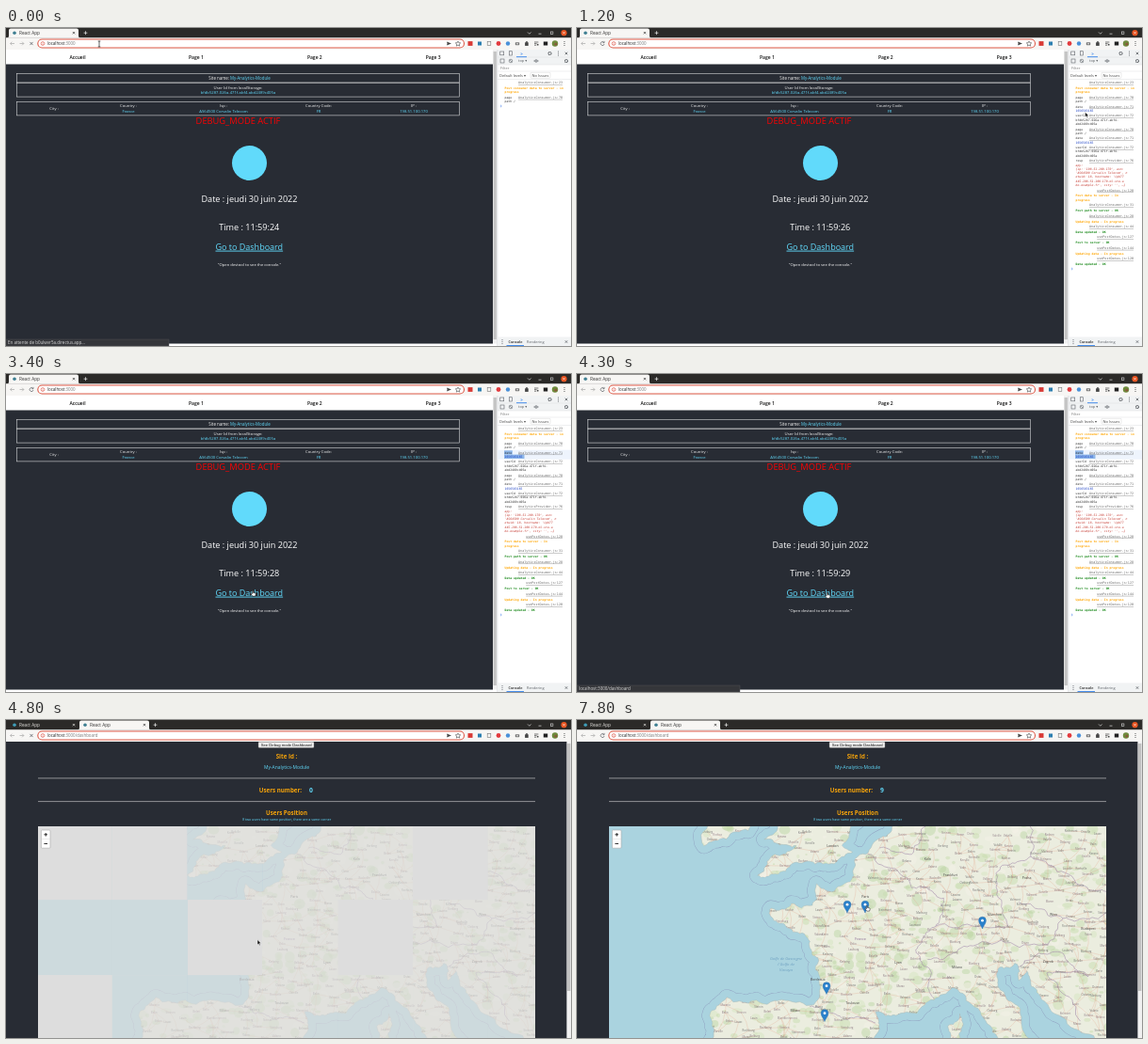
Write an HTML page that moves like this. It is 600 by 338 pixels and loops after 8000 ms.

```html
<!DOCTYPE html>
<html lang="fr">
<head>
<meta charset="utf-8">
<title>React App</title>
<style>
html, body { margin: 0; width: 100%; height: 100%; overflow: hidden; background: #fff; }
svg { display: block; width: 600px; height: 338px; font-family: "Open Sans", "Noto Sans", sans-serif; }
.mono { font-family: "DejaVu Sans Mono", "Liberation Mono", monospace; }
.plain { font-family: "Liberation Sans", sans-serif; }
.mid { text-anchor: middle; }
.end { text-anchor: end; text-decoration: underline; }
.link { text-decoration: underline; }
.bold { font-weight: 700; }
.semi { font-weight: 600; }
.ital { font-style: italic; }
</style>
</head>
<body>
<svg id="stage" viewBox="0 0 600 338" xmlns="http://www.w3.org/2000/svg"></svg>
<script>
const LOOP = 8000, DARK = '#282c34', CYAN = '#61dafb', ORANGE = '#f5a30a', GREY = '#5f6368';
const SITE = 'My-Analytics-Module', IP = '198.51.100.170', ISP = 'AS64500 Corvalin Telecom';

// Drawing helpers; text is placed by its visual middle line.
const text = (x, y, s, size, fill, cls = '', id = '') =>
  `<text x="${x}" y="${y + size * 0.35}" font-size="${size}" fill="${fill}" class="${cls}" ${id && `id="${id}"`}>${s}</text>`;
const rect = (x, y, w, h, fill, more = '') =>
  `<rect x="${x}" y="${y}" width="${w}" height="${h}" fill="${fill}" ${more}/>`;
const frame = (x, y, w, h, stroke, width = 0.6) => rect(x, y, w, h, 'none', `stroke="${stroke}" stroke-width="${width}"`);
const dot = (x, y, r, fill, more = '') => `<circle cx="${x}" cy="${y}" r="${r}" fill="${fill}" ${more}/>`;
const ring = (x, y, r, stroke) => dot(x, y, r, 'none', `stroke="${stroke}" stroke-width=".6"`);
const line = (d, stroke, w = 0.7, more = '') =>
  `<path d="${d}" fill="none" stroke="${stroke}" stroke-width="${w}" ${more}/>`;
const group = (id, body, more = '') => `<g id="${id}" ${more}>${body}</g>`;
const cross = (x, y, r, c, w = 0.8) =>
  line(`M${x - r} ${y - r}l${2 * r} ${2 * r}M${x + r} ${y - r}l${-2 * r} ${2 * r}`, c, w);
const plus = (x, y, r, c, w = 0.8) => line(`M${x - r} ${y}h${2 * r}M${x} ${y - r}v${2 * r}`, c, w);
const dots = (x, y, c) => [-2, 0, 2].map(d => dot(x, y + d, 0.55, c)).join('');
const gear = (x, y) => dot(x, y, 1.5, 'none', `stroke="${GREY}" stroke-width="1.1" stroke-dasharray="1 .3"`);

// Browser window
function tab(x, active, favicon) {
  const c = active ? '#333' : '#e4e2de';
  return (active ? `<path d="M${x + 1} 10.5q2 0 2-2V2.5q0-2 2-2H${x + 75}q2 0 2 2V8.5q0 2 2 2z" fill="#f7f6f4"/>` : '') +
    dot(x + 9, 5.2, 1.8, favicon) + text(x + 14, 5.2, 'React App', 4.7, c) + cross(x + 72, 5.2, 1.2, c, 0.7);
}
function extensions(y) {
  const dark = '#444', icons = [
    x => rect(x - 2.5, y - 2.4, 5, 4.8, '#d93a36'),
    x => rect(x - 2, y - 2, 4, 4, '#2c7fb0'),
    x => frame(x - 1.8, y - 2, 3.6, 4, '#777'),
    x => dot(x, y, 2.4, '#e23b3f'),
    x => dot(x, y, 2.2, '#4a90d9'),
    x => rect(x - 2.2, y - 1.3, 4.4, 3, '#777', 'rx=".6"') + dot(x, y + 0.2, 0.8, '#f7f6f4'),
    x => rect(x - 1.9, y - 1.2, 3.6, 3.6, dark) + dot(x, y - 1.5, 0.9, dark),
    x => line(`M${x - 2} ${y - 1.5}h4.4m-4.4 1.6h2.6m-2.6 1.6h2.2`, dark) + dot(x + 1.7, y + 1.2, 0.9, dark),
    x => rect(x - 2.2, y - 2, 4.4, 4, '#222'),
    x => dot(x, y, 3.2, '#6f8b3d') + dot(x + 0.8, y + 0.7, 1.4, '#8a5c3c'),
    x => dots(x, y, dark)];
  return icons.map((icon, i) => icon(493 + i * 10)).join('');
}
function browser() {
  const y = 16.5, light = '#ddd';
  return rect(0, 0, 600, 10.5, '#2b2a28') +
    group('tabsOne', tab(0, true, '#3f7f92') + plus(84.5, 5.2, 1.9, light)) +
    group('tabsTwo', tab(0, false, '#3f9db8') + tab(75, true, '#3f7f92') + plus(158.5, 5.2, 1.9, light)) +
    line('M554 4.5l1.8 1.8 1.8-1.8M565.5 6.2h3', light) + frame(578.3, 4, 2.6, 2.6, light) +
    dot(592.5, 5.2, 3.1, '#e95420') + cross(592.5, 5.2, 1.1, '#fff', 0.6) +
    rect(0, 10.5, 600, 12.5, '#f7f6f4') +
    line(`M9 ${y}h-4.4m1.8-1.8l-1.8 1.8 1.8 1.8M14.5 ${y}h4.4m-1.8-1.8l1.8 1.8-1.8 1.8`, '#aaa') +
    group('stop', cross(27, y, 1.6, GREY)) +
    group('reload', line('M28.7 15.4a2 2 0 1 0 .3 1.6M29 13.9v1.8h-1.8', GREY)) +
    rect(33.8, 12, 452.7, 9, '#fff', 'rx="4.5" stroke="#dd5a48" stroke-width="1.1"') +
    ring(39, y, 1.9, '#d9483b') + line('M39 15.4v.5m0 .5v1.4', '#d9483b', 0.6) +
    text(44, y, '<tspan fill="#222">localhost</tspan>:3000<tspan id="path"></tspan>', 4.4, '#777') +
    '<path d="M468 14.4l5 2.1-5 2.1.6-2.1z" fill="#444"/>' +
    line('M480 14l.8 1.7 1.9.2-1.4 1.3.4 1.9-1.7-1-1.7 1 .4-1.9-1.4-1.3 1.9-.2z', '#444', 0.6) + extensions(y);
}

// Home page
function home() {
  const nav = ['Accueil', 'Page 1', 'Page 2', 'Page 3'];
  const info = [['Country :', 'France'], ['Isp :', ISP], ['Country Code:', 'FR'], ['IP :', IP]];
  const w = '#f4f4f4', mid = 'mid', box = (y, h) => frame(11.6, y, 469.8, h, '#d5d6d8');
  return rect(0, 23, 522, 315, '#fff') + rect(0, 38.5, 517, 297, DARK) +
    nav.map((s, i) => text(76 + i * 125.9, 31, s, 5, '#111', 'mid semi')).join('') +
    box(48.5, 9.6) + box(58.1, 15) + box(78.3, 14.6) +
    text(248, 53.3, `Site name: <tspan fill="${CYAN}">${SITE}</tspan>`, 4.4, w, mid) +
    text(246.5, 63.6, 'User Id from localStorage:', 4.3, w, mid) +
    text(246.5, 68.6, 'bfdb5287-026a-471f-abf4-abd2489c405a', 4.2, CYAN, mid) +
    text(51, 85.8, 'City :', 4.2, w, mid) +
    info.map(([k, v], i) => text(130 + i * 101, 83, k, 4.2, w, mid) + text(130 + i * 101, 88.3, v, 4.2, CYAN, mid)).join('') +
    text(246.5, 99, 'DEBUG_MODE ACTIF', 9.3, '#f00', mid) +
    dot(258.5, 143.5, 18.5, CYAN) +
    text(258.5, 182.3, 'Date : jeudi 30 juin 2022', 9.1, '#fff', mid) +
    text(258.3, 212.3, '', 9.1, '#fff', mid, 'clock') +
    text(258.3, 232.5, 'Go to Dashboard', 9, CYAN, 'mid link') +
    text(258.5, 251.5, '"Open devtool to see the console."', 4.2, '#fff', mid) +
    rect(517, 23, 4.6, 312.5, '#f1f1f1') + rect(517.6, 25, 3.3, 306, '#c4c4c4') +
    group('status', rect(0, 331, 173, 7, '#35363a', 'stroke="#55565a" stroke-width=".4"') + text(2, 334.7, '', 4.5, '#ddd', '', 'statusText')) +
    devtools();
}

// Console: entries flow downwards; each row keeps the time it appears.
function consoleRows() {
  const ANALYTICS = 'AnalyticsConsumer.js:', POST = 'usePostDatas.js:';
  const INK = '#333', BLUE = '#1a3fc4', RED = '#c4382f', AMBER = '#ffa500', GREEN = '#1c8a1c';
  const LINE = 4.3, LEAD = 5.9, GAP = 5.5, rows = [];
  let y = 58;
  const entry = (at, link, label, lines, fill = INK, cls = '') => {
    rows.push({ at, y, s: label, fill: INK, cls: '', link });
    lines.forEach((s, i) => {
      y += label || i ? LINE : LEAD;
      rows.push({ at, y, s, fill, cls, link: '' });
    });
    y += GAP;
  };
  const message = (at, link, fill, ...lines) => entry(at, link, '', lines, fill, 'bold');

  message(0, ANALYTICS + 23, AMBER, 'Post consumer data to server - in', 'progress');
  for (const at of [0, 400]) {
    entry(at, ANALYTICS + 70, 'page', ['path /']);
    entry(at || 300, ANALYTICS + 71, 'date', ['1656583165'], BLUE);
    entry(at || 300, ANALYTICS + 72, 'userId', ['bfdb5287-026a-471f-abf4-', 'abd2489c405a']);
  }
  entry(500, 'AnalyticsProvider.js:76', 'resp', ['apy:', `{ip: '${IP}', asn:`, `'${ISP}', n`,
    "etwid: 18, hostname: 'ipb77", '445-198-51-100-170.ml.ste.a', "bo.example.fr', city: '', …}"], RED, 'ital');
  message(600, POST + 120, AMBER, 'Post data to server - In', 'progress');
  message(700, ANALYTICS + 31, GREEN, 'Post path to server - OK');
  message(700, ANALYTICS + 28, AMBER, 'Updating data - In progress');
  message(800, ANALYTICS + 44, GREEN, 'Data updated - OK');
  message(800, POST + 127, GREEN, 'Post to server - OK');
  message(900, POST + 144, AMBER, 'Updating data - In progress');
  message(900, POST + 120, GREEN, 'Data updated - OK');
  return rows;
}
const rows = consoleRows();
function devtools() {
  const rule = y => line(`M522 ${y}h78`, '#d5d7da', 0.4);
  return rect(521.6, 23, 78.4, 315, '#fff') + rect(522, 23, 78, 16, '#f1f3f4') + line('M521.8 23V338', '#c5c7ca', 0.5) +
    [31, 39, 46, 54.5, 329].map(rule).join('') +
    frame(524.7, 25, 4, 3.8, GREY) + frame(534.5, 24.7, 2.8, 4.3, GREY) +
    text(547.5, 26.8, '»', 5, '#1a73e8', 'mid') + line('M542 30.7h11', '#1a73e8', 0.8) +
    gear(577.5, 27) + dots(586.5, 27, GREY) + cross(595, 27, 1.3, GREY) +
    frame(525, 33, 4, 4, GREY) + ring(536, 35, 1.8, GREY) + line('M534.7 33.7l2.6 2.6', GREY, 0.6) +
    text(544, 35, 'top ▾', 4, GREY) + line('M560.6 35q2.4-3 4.8 0q-2.4 3-4.8 0', GREY, 0.6) + dot(563, 35, 0.8, GREY) + gear(595, 35) +
    text(525, 43, 'Filter', 4, '#777') + text(524, 50.3, 'Default levels ▾', 4, '#444') +
    rect(557, 47.3, 21, 6, '#fff', 'rx="1" stroke="#ccc" stroke-width=".4"') + text(567.5, 50.3, 'No Issues', 4, '#444', 'mid') +
    group('selection', rect(522, 80.7, 78, 10, '#eef4fd') + rect(529, 81.3, 8.8, 4.3, '#8fb8ea') + rect(529, 85.6, 21.5, 4.4, '#8fb8ea')) +
    group('log', rows.map(r => `<g>${r.s && text(529.5, r.y, r.s, 3.15, r.fill, 'mono ' + r.cls)}` +
      `${r.link && text(591, r.y, r.link, 3.4, '#666', 'mono end')}</g>`).join('')) +
    group('prompt', line('M525 -1.2l1.3 1.2-1.3 1.2', '#3b78e7', 0.6)) +
    rect(522, 329, 78, 9, '#f1f3f4') + dots(527, 333.5, GREY) + text(533.5, 333.5, 'Console', 3.9, '#222', 'semi') +
    line('M531.5 337.5h18.5', '#1a73e8', 0.8) + text(553, 333.5, 'Rendering', 3.9, GREY) + cross(595, 333.5, 1.2, GREY);
}

// Map: Web Mercator with 80 px tiles; outlines are a few places joined by rough lines.
const TILE = 80;
let seed = 7;
const rnd = () => (seed = seed * 16807 % 2147483647) / 2147483647;
const pick = list => list[Math.floor(rnd() * list.length)];
const project = (lon, lat) => [272.8 + lon * TILE / 5.625,
  191 + TILE * (10 - 32 * Math.asinh(Math.tan(lat * Math.PI / 180)) / Math.PI)];
function roughen([x, y], [u, v], depth) {
  const length = Math.hypot(u - x, v - y);
  if (!depth || length < 3) return [[u, v]];
  const shift = (rnd() - 0.5) * Math.min(0.4, 8 / length);
  const mid = [(x + u) / 2 + (v - y) * shift, (y + v) / 2 - (u - x) * shift];
  return [...roughen([x, y], mid, depth - 1), ...roughen(mid, [u, v], depth - 1)];
}
function outline(places) {
  const points = places.split(' ').map(p => project(...p.split(',').map(Number)));
  const path = points.flatMap((p, i) => i ? roughen(points[i - 1], p, 4) : [p]);
  return 'M' + path.map(p => p.map(v => v.toFixed(1)).join(' ')).join('L');
}
const coasts = [
  '22,54 4.7,54 4.2,52.1 1.6,50.9 1.5,50.1 -.2,49.3 -1.3,49.7 -1.6,48.65 -4.7,48.5 -4.5,47.9 -2.1,47.1 -1.2,46 -1.5,43.5 -5.8,43.75 -8,43.9 -9.2,43.1 -8.8,40 2,40.5 3.2,41.9 3.1,43.1 6.2,43.05 8.8,44.4 10.3,43.5 12.7,41 16,40 14,42.7 12.4,44.3 12.4,45.5 13.5,45.7 13.8,44.8 14.4,45.3 15.5,43.8 19.4,41.8 22,40',
  '-5.7,50.1 -3.6,50.3 -3,50.7 .2,50.75 1.4,51.2 .6,51.5 1.7,52.6 1.7,54 -4,54 -4.2,52.4 -5.2,51.8 -2.8,51.5 -4.4,51.1 -5.7,50.1',
  '-6.3,54 -6.4,52.2 -9.7,51.5 -9.7,54', '8.6,42.4 9.4,43 9.4,41.5 8.7,41.7 8.6,42.4'];
const borders = ['-1.8,43.4 .7,42.7 3.1,42.5', '2.5,51.1 5.8,49.5 8.2,49 7.6,47.6 6.1,46.4 7,45.5 7.5,43.8',
  '7.6,47.6 13,47.6 12.1,50.2 14.7,51 14.6,52.6', '7,45.9 10.4,46.6 16,46.7 17.1,48 13.8,48.8',
  '14.7,51 18.7,49.6 20.5,49.3', '17.1,48 20.5,48.3', '3.4,51.4 5.8,51.1 7,52.6', '13.6,45.5 16.5,46.3 19,45 15.9,45.2 18.4,42.6'];
const cities = 'Paris,2.35,49.05 London,-.1,51.5 Bordeaux,-1.2,44.85 Toulouse,1.4,43.6 Lyon,4.8,45.75 Bilbao,-2.9,43.2 Köln,7,50.9 Frankfurt,8.7,50.1 München,12,48.2 Praha,14.4,50 Wien,16.4,48.2 Milano,9.2,45.5 Zagreb,16,45.8 Budapest,19,47.5'
  .split(' ').map(c => { const [name, lon, lat] = c.split(','); return [name, ...project(lon, lat)]; });

// Small print: made-up town names on a jittered grid.
function scatterTowns() {
  const towns = [];
  for (let y = 118; y < 338; y += 9) for (let x = 130; x < 570; x += 19) {
    const spot = [x + rnd() * 16, y + rnd() * 7];
    const name = pick(['Bel', 'Mar', 'Lau', 'Ost', 'Val', 'Ker', 'Roch', 'Stein']) + pick(['ville', 'berg', 'mont', 'ac', 'burg', 'ano', 'in', 'en']);
    if (cities.every(([, u, v]) => Math.abs(u - spot[0]) > 15 || Math.abs(v - spot[1]) > 5)) towns.push([name, ...spot]);
  }
  return towns;
}
function terrain() {
  let s = '';
  for (let i = 0; i < 900; i++) {
    const x = 120 + rnd() * 445, y = 110 + rnd() * 230, r = 1 + rnd() * 5;
    s += `<ellipse cx="${x.toFixed(1)}" cy="${y.toFixed(1)}" rx="${r.toFixed(1)}" ry="${(r * (0.4 + rnd() * 0.8)).toFixed(1)}" ` +
      `fill="${pick(['#c3d9a8', '#d3e2bd', '#b9d3a0', '#f3efe6'])}" opacity=".45"/>`;
  }
  return s;
}
function roads(places) {
  let d = '';
  places.forEach(([, x, y], i) => places.slice(i + 1).forEach(([, u, v]) => {
    if (Math.hypot(u - x, v - y) < 22 && rnd() < 0.4)
      d += `M${x.toFixed(1)} ${y.toFixed(1)}Q${((x + u) / 2 + (v - y) * 0.15).toFixed(1)} ${((y + v) / 2).toFixed(1)} ${u.toFixed(1)} ${v.toFixed(1)}`;
  }));
  return line(d, '#e0a58e', 0.4, 'opacity=".7"');
}
const pin = (x, y) => `<path transform="translate(${x} ${y})" d="M0 0C-1-3.2-3.9-5.5-3.9-8.9a3.9 3.9 0 0 1 7.8 0C3.9-5.5 1-3.2 0 0z" fill="#2a81cb" stroke="#2569a5" stroke-width=".4"/>` + dot(x, y - 8.8, 1.4, '#fff');

function map() {
  const land = coasts.map(outline).join('Z') + 'Z';
  const towns = scatterTowns(), late = ['0,0', '1,0', '5,0', '2,1', '4,1', '0,2'];
  let veil = '';
  for (let row = 0; row < 3; row++) for (let col = 0; col < 7; col++)
    veil += rect(33 + col * 79.8, 111 + row * TILE, 79.9, TILE + 0.1, '#ddd', `class="veil" data-from="${late.includes(col + ',' + row) ? 4800 : 4740}"`);
  return `<clipPath id="frame">${rect(34, 113, 528, 225, '#000')}</clipPath><clipPath id="land"><path d="${land}"/></clipPath>` +
    group('map', rect(34, 113, 528, 225, '#aad3df') +
      line(land, '#8f9fc0', 17, 'stroke-linejoin="round"') + line(land, '#aad3df', 16.2, 'stroke-linejoin="round"') +
      `<path d="${land}" fill="#ebeddf" stroke="#a5b9b6" stroke-width=".5"/>` +
      `<g clip-path="url(#land)">${terrain()}${roads([...cities, ...towns])}` +
      borders.map(b => line(outline(b), '#a78fae', 0.6)).join('') +
      towns.map(([n, x, y]) => text(x, y, n, 2.9, pick(['#777', '#8a7a80', '#96848c']), 'mid')).join('') + '</g>' +
      cities.map(([n, x, y]) => text(x, y, n, 3.5, '#444', 'mid')).join('') +
      text(301, 233, 'France', 3.9, '#8d6f97', 'mid') +
      ['Golfe de Gascogne', '/ Golfo de', 'Vizcaya'].map((s, i) => text(222, 254 + i * 6, s, 4.2, '#6d9fc0', 'mid ital')).join('') +
      veil + group('pins', pin(287, 205) + pin(306, 205) + pin(430.5, 222) + pin(265, 291.5) + pin(263, 320.5)),
      'clip-path="url(#frame)"') +
    rect(37.4, 117, 9.6, 19.2, '#fff', 'rx="1" stroke="#aaa" stroke-width=".6"') + line('M37.5 126.6h9.4', '#ccc', 0.4) +
    plus(42.2, 121.8, 1.8, '#000') + line('M40.4 131.5h3.6', '#000', 0.8);
}
function dashboard() {
  const head = (x, y, s) => text(x, y, s, 6.2, ORANGE, 'mid bold');
  return rect(0, 23, 600, 315, DARK) +
    rect(268, 23.2, 59, 6.2, '#efefef', 'rx=".8" stroke="#777" stroke-width=".4"') + text(297.7, 26.2, 'See Debug mode Dashboard', 4.17, '#111', 'mid plain') +
    head(298, 39, 'Site Id :') + text(298, 50.4, SITE, 4.95, CYAN, 'mid') +
    head(291.4, 74.5, 'Users number:') + text(324, 74.5, '0', 6.8, CYAN, 'mid bold', 'users') +
    head(298, 99, 'Users Position') + text(298, 106, 'If two users have same position, there are a same corner', 3.58, CYAN, 'mid') +
    line('M34 61.9H562M34 86.6H562', '#c9c9c9', 0.65) + map() +
    rect(595.4, 23, 4.6, 315, '#f1f1f1') + rect(596, 25, 3.4, 263, '#c1c1c1');
}

const cursors = group('cursor',
  group('beam', line('M-1.3-3h2.6M0-3v6M-1.3 3h2.6', '#222', 0.7)) +
  group('arrow', '<path d="M0-2.4v5.3l1.3-1.1.9 1.9.9-.4-.9-1.9h1.7z" fill="#111" stroke="#fff" stroke-width=".45"/>') +
  group('hand', '<path d="M-.6-2.6q.7-.5 1 0v2l2.1.5q.9.3.7 1.2l-.6 2h-2.8l-1.9-2.3q.2-.8 1.5-.1z" fill="#fff" stroke="#111" stroke-width=".5"/>'));

document.getElementById('stage').innerHTML =
  group('home', home()) + group('dash', dashboard()) + group('blank', rect(0, 23, 600, 315, '#fefefe')) + browser() + cursors;

const $ = id => document.getElementById(id);
const show = (el, on) => el.setAttribute('visibility', on ? 'inherit' : 'hidden');
const clamp = v => Math.max(0, Math.min(1, v));
const veils = [...document.querySelectorAll('.veil')], logRows = [...$('log').children];

// Pointer stops: [time, x, y], eased in between
const stops = [[0, 99, 17], [1100, 539, 92], [1800, 550, 88], [2700, 288, 128], [3300, 262, 233], [4800, 267, 236],
  [5300, 206, 58], [5500, 290, 33], [5800, 354, 33], [6400, 533, 64], [6800, 533, 64], [7400, 345, 232], [7700, 308, 200], [LOOP, 308, 200]];
function pointer(t) {
  const i = stops.findIndex(s => s[0] > t), [a, x, y] = stops[i - 1], [b, u, v] = stops[i];
  const p = (t - a) / (b - a), e = p * p * (3 - 2 * p);
  return [x + (u - x) * e, y + (v - y) * e];
}

function draw(ms) {
  const t = Math.floor(ms / 100) * 100;
  const second = t >= 4500, waiting = t < 800;
  show($('home'), !second);
  show($('dash'), t >= 4700);
  show($('blank'), second && t < 4700);
  show($('tabsOne'), !second);
  show($('tabsTwo'), second);
  const loading = t < 900 || (second && t < 5200);
  show($('stop'), loading);
  show($('reload'), !loading);
  $('path').textContent = second ? '/dashboard' : '';

  $('clock').textContent = 'Time : 11:59:' + (24 + Math.floor((t + 900) / 1000));
  show($('status'), !second && (waiting || t >= 3500));
  $('statusText').textContent = waiting ? 'En attente de b0ulwvr5a.directus.app…' : 'localhost:3000/dashboard';
  rows.forEach((row, i) => show(logRows[i], t >= row.at));
  const last = Math.max(...rows.filter(row => t >= row.at).map(row => row.y));
  $('prompt').setAttribute('transform', `translate(0 ${last + 5})`);
  show($('selection'), !second && t >= 1700);

  veils.forEach(v => v.setAttribute('opacity', 1 - clamp((t - v.dataset.from) / 200)));
  $('users').textContent = t < 5100 ? 0 : 9;
  show($('pins'), t >= 5100);

  const [x, y] = pointer(t);
  const hand = (t >= 3300 && t < 4500) || t >= 7800;
  $('cursor').setAttribute('transform', `translate(${x.toFixed(1)} ${y.toFixed(1)})`);
  show($('beam'), t < 200);
  show($('hand'), hand);
  show($('arrow'), t >= 200 && !hand);
}

const start = performance.now();
function tick() {
  draw((performance.now() - start) % LOOP);
  requestAnimationFrame(tick);
}
tick();
</script>
</body>
</html>
```
